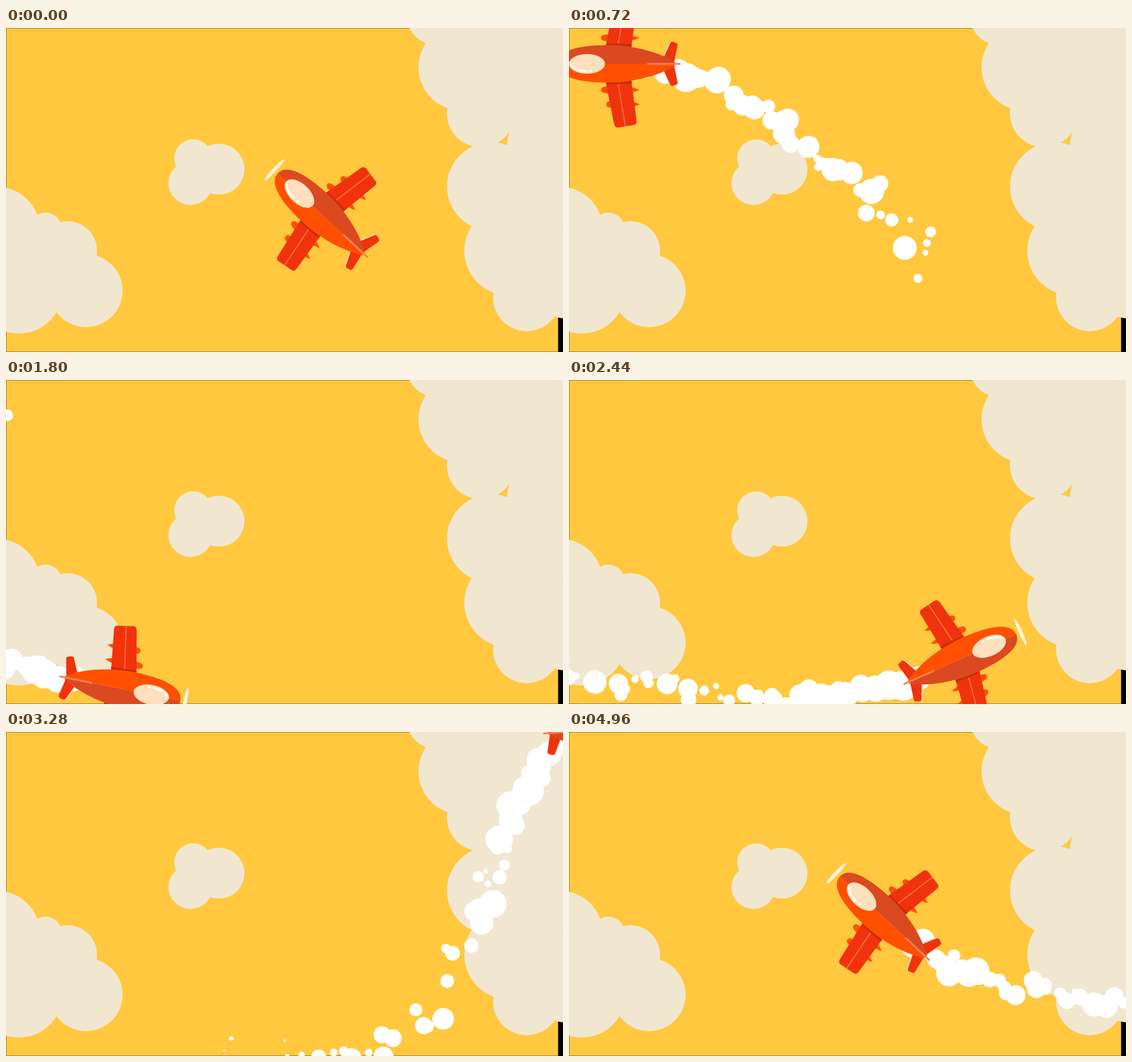
An HTML page for the animation above (5000 ms loop, 960 by 560 pixels).

```html
<!DOCTYPE html>
<html lang="en">
<head>
<meta charset="utf-8">
<title>Little red plane</title>
<style>
  html, body { margin: 0; width: 100%; height: 100%; overflow: hidden; background: #000; }
  svg { display: block; }
</style>
</head>
<body>
<svg width="960" height="560" viewBox="0 0 960 560">
  <defs>
    <g id="half">
      <g fill="#fc5205">
        <path d="M-27,45C-27,39 -18,39 -10,39H15Q30,40 39,45Q30,49 15,51H-10C-18,51 -27,51 -27,45Z"/>
        <path d="M-18,70C-18,64 -10,64 -4,64H18Q32,65 40,70Q32,74 18,76H-4C-10,76 -18,76 -18,70Z"/>
      </g>
      <path fill="#f0330d" d="M-20,25L-4,105Q-2.500,110.500 3,110L30,105.500Q35,104.500 34.500,99L25,25Z"/>
      <path fill="#c82c0b" d="M-19,29H25.500L26.300,34L-17.500,35.500Z"/>
      <path stroke="#ff6d3f" stroke-width="2" d="M3,35L15,107.500"/>
      <path fill="#ffe6c4" d="M76,4L90,35Q91.500,39 95.500,38L99,31V0Z"/>
      <path fill="#f0330d" d="M78,4L92,35Q93.500,39 97.500,38L103,36Q106,35 105,31L98.500,0Z"/>
    </g>
  </defs>

  <rect x=".35" y=".35" width="951.200" height="559.300" fill="#ffc83f"/>

  <g fill="#f1e7d1">
    <!-- small cloud -->
    <circle cx="322.500" cy="225" r="32.500"/>
    <circle cx="367" cy="244" r="44"/>
    <circle cx="318" cy="268" r="38"/>
    <!-- left cloud -->
    <path d="M0,350H80V460H0Z"/>
    <circle cx="-17" cy="350" r="76"/>
    <circle cx="68" cy="347" r="28"/>
    <circle cx="106" cy="385" r="51"/>
    <circle cx="138" cy="454" r="63"/>
    <circle cx="22" cy="452" r="76"/>
    <!-- right cloud -->
    <path d="M960,0H750L790,60L830,130L870,165L900,200V260L840,270L870,400L900,450L960,480Z"/>
    <circle cx="742" cy="-22" r="51.500"/>
    <circle cx="786" cy="68" r="75"/>
    <circle cx="818.500" cy="147.500" r="58.500"/>
    <circle cx="939.500" cy="205" r="76"/>
    <circle cx="836.500" cy="274" r="76.500"/>
    <circle cx="867.500" cy="385" r="77.500"/>
    <circle cx="897.500" cy="466" r="58"/>
    <circle cx="968" cy="425" r="77.300"/>
  </g>

  <path id="smoke" fill="#fff"/>

  <g id="plane" fill="none">
    <use href="#half"/>
    <use href="#half" transform="scale(1 -1)"/>
    <path fill="#ff5000" d="M-102,0C-102,24 -62,32.500 -15,32.500C40,32.500 85,14 100,3Q102,1.500 102,0Z"/>
    <path fill="#db4920" d="M-102,0C-102,-24 -62,-32.500 -15,-32.500C40,-32.500 85,-14 100,-3Q102,-1.500 102,0Z"/>
    <path stroke="#ff7d58" stroke-width="3.200" stroke-linecap="round" d="M54,0H109"/>
    <ellipse cx="-51" rx="31" ry="17" fill="#ffe0be"/>
    <path stroke="#fff" stroke-width="3.400" stroke-linecap="round" d="M-78,3Q-72,11.500 -53,12.500"/>
    <circle cx="-44.500" cy="12" r="2" fill="#fff"/>
    <ellipse cx="-110.500" rx="3.200" ry="24.800" fill="#fff3da"/>
  </g>
</svg>
<script>
const LOOP = 5000, STEP = 40;
const LAP = 4957;    // ms for one round of the flight path
const SPEED = 745;   // px per second along the path
const DRIFT = 215;   // px per second, smoke blown backwards
const RATE = 80;     // puffs per second

const plane = document.getElementById("plane");
const smoke = document.getElementById("smoke");

const key = (ms, x, y, deg) => {
  const a = deg * Math.PI / 180;
  return { ms, x, y, vx: SPEED * Math.cos(a), vy: SPEED * Math.sin(a) };
};

// turning points of the figure eight, each with its heading
const route = [
  key(0, 543, 321, 223.2),
  key(720, 82, 62, 180),
  key(1260, -112, 350, 85),
  key(1800, 200.5, 534, 11.4),
  key(2440, 677.5, 481, -24),
  key(3280, 1036, -5, -4),
  key(4240, 1053.5, 437, 166)
];
route.push({ ...route[0], ms: LAP });

// cubic from p to q with end slopes m and n: value and slope at u
function cubic(p, q, m, n, u) {
  const c3 = 2 * (p - q) + m + n, c2 = 3 * (q - p) - 2 * m - n;
  return [p + u * (m + u * (c2 + u * c3)), m + u * (2 * c2 + 3 * u * c3)];
}

function fly(ms) {
  ms %= LAP;
  const i = route.findIndex(k => k.ms > ms);
  const a = route[i - 1], b = route[i];
  const span = b.ms - a.ms, u = (ms - a.ms) / span, s = span / 1000;
  const [x, dx] = cubic(a.x, b.x, a.vx * s, b.vx * s, u);
  const [y, dy] = cubic(a.y, b.y, a.vy * s, b.vy * s, u);
  return { x, y, dir: Math.atan2(dy, dx) };
}

let seed = 29;
const rand = () => (seed = (seed * 16807) % 2147483647) / 2147483647;
const spread = d => (rand() * 2 - 1) * d;

// puffs leave the middle of the plane and blow back past the tail
const puffs = Array.from({ length: LOOP / 1000 * RATE }, (_, i) => {
  const born = i / RATE, p = fly(born * 1000);
  return {
    born,
    x: p.x + spread(8),
    y: p.y + spread(8),
    vx: -DRIFT * Math.cos(p.dir) + spread(42),
    vy: -DRIFT * Math.sin(p.dir) + spread(42),
    size: 8 + 18 * rand(),
    life: 0.4 + 0.8 * rand()
  };
});

function disc(x, y, r) {
  const [l, t, s, d] = [x - r, y, r, 2 * r].map(v => v.toFixed(2));
  return `M${l},${t}a${s},${s} 0 1 1 ${d},0a${s},${s} 0 1 1 -${d},0`;
}

function draw(ms) {
  const p = fly(ms), now = ms / 1000;
  const turn = p.dir * 180 / Math.PI + 180;
  plane.setAttribute("transform", `translate(${p.x} ${p.y}) rotate(${turn})`);
  let d = "";
  for (const q of puffs) {
    const age = now - q.born;
    if (age <= 0 || age >= q.life) continue;
    const r = q.size * (1 - (age / q.life) ** 3);
    d += disc(q.x + q.vx * age, q.y + q.vy * age, r);
  }
  smoke.setAttribute("d", d);
}

const start = performance.now();
function tick() {
  const ms = (performance.now() - start + 1) % LOOP;
  draw(Math.floor(ms / STEP) * STEP);
  requestAnimationFrame(tick);
}
tick();
</script>
</body>
</html>
```
